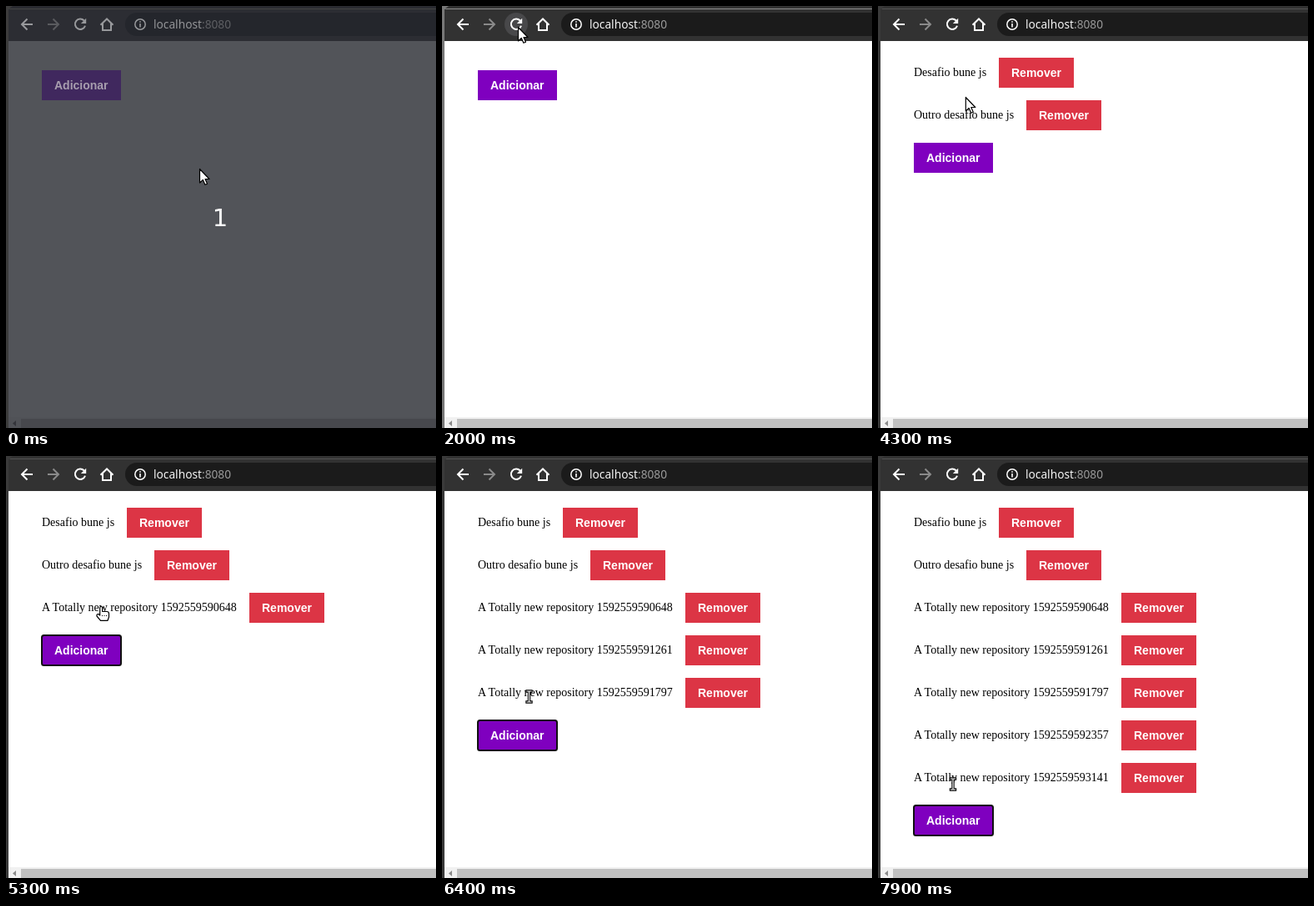
Write an HTML page that moves like this. It is 516 px wide and 506 px high and loops after 8000 ms.

```html
<!DOCTYPE html>
<html lang="pt">
<head>
<meta charset="utf-8">
<title>Lista</title>
<style>
  html, body { margin: 0; width: 100%; height: 100%; overflow: hidden; background: #fff; }
  svg {
    display: block; width: 516px; height: 506px;
    --page: #fff; --bar: #323232; --pill: #1b1b1b; --icon: #fff; --off: #8a8a8a;
    --url: #f4f4f4; --port: #9a9a9a; --button: #7f00bf; --label: #fff;
    --track: #f1f1f1; --thumb: #c1c1c1; --tri: #8a8a8a; --top: #333;
  }
  svg.dim {
    --page: #525459; --bar: #2c2d33; --pill: #24262c; --icon: #98999c; --off: #5a5b5f;
    --url: #939497; --port: #5e5f63; --button: #40285e; --label: #a79eae;
    --track: #505257; --thumb: #47484d; --tri: #33343a; --top: #2a2b31;
  }
  .line { fill: none; stroke: var(--icon); stroke-width: 2; }
  .url { font: 13.72px "Noto Sans", "Open Sans", sans-serif; fill: var(--url); }
  .label { font: bold 14px "Liberation Sans", Arial, sans-serif; fill: var(--label); }
  .item { font: 14px "Liberation Serif", "Times New Roman", serif; fill: #000; }
  .count { font: 29px "DejaVu Sans", sans-serif; fill: #fff; text-anchor: middle; }
</style>
</head>
<body>
<svg id="stage" viewBox="0 0 516 506">
  <rect id="edge" width="516" height="506"/>
  <path d="M8 0H516V3H4z" fill="var(--top)"/>
  <rect id="rim" x="5" y="3" width="511" height="1"/>
  <rect x="3" y="4" width="513" height="38" fill="var(--bar)"/>
  <circle id="hover" cx="89" cy="22" r="14" fill="#48484a"/>
  <path class="line" d="M32 22H19.5M25.5 15.500L19 22L25.500 28.500"/>
  <path class="line" style="stroke:var(--off)" d="M50 22H62.500M56.500 15.500L63 22L56.500 28.500"/>
  <g id="reload">
    <path class="line" d="M93.700 17.500A6.200 6.200 0 1 0 95 23.700"/>
    <path d="M96.200 14.800V21.100H89.900z" fill="var(--icon)"/>
  </g>
  <path id="stop" class="line" d="M84 17L94 27M94 17L84 27"/>
  <path class="line" d="M113.500 22.800L121 15.500L128.500 22.800M116 21V29H126V21"/>
  <rect x="143" y="8" width="400" height="28" rx="14" fill="var(--pill)"/>
  <circle class="line" cx="161" cy="22" r="6.200" style="stroke-width:1.500"/>
  <path class="line" d="M161 18.200V19.800M161 21V25.500" style="stroke-width:1.600"/>
  <text class="url" x="177" y="27">localhost<tspan fill="var(--port)">:8080</tspan></text>

  <rect x="3" y="42" width="513" height="464" fill="var(--page)"/>
  <g id="page">
    <rect x="3" y="493" width="513" height="13" fill="var(--track)"/>
    <rect x="18" y="495" width="498" height="11" fill="var(--thumb)"/>
    <path d="M12 497V504L8 500.500z" fill="var(--tri)"/>
    <g id="rows"></g>
    <g id="add">
      <rect x="43" width="95" height="36" fill="var(--button)"/>
      <rect id="ring" x="43" width="95" height="36" rx="2.500" fill="none" stroke="#101010" stroke-width="2"/>
      <text class="label" x="58" y="23">Adicionar</text>
    </g>
  </g>
  <text id="count" class="count" x="257" y="264">1</text>

  <g id="cursor" stroke-linejoin="round">
    <path id="arrow" d="M.5 .5V17L4.300 13.500L6.900 19.300L9.500 18.200L7 12.500H12z" fill="#fff" stroke="#000" stroke-width="1.200"/>
    <g id="hand" transform="translate(-5.500 -1)">
      <path d="M4.700 10V2A1.500 1.500 0 0 1 7.700 2V6.500H13Q15.500 6.500 15.500 9V13L14 17.300H5.500L1 12Q.4 9.300 3 9.500L4.700 11z" fill="#fff" stroke="#000" stroke-width="1.200"/>
      <path d="M7 11.500H13" stroke="#000" stroke-dasharray="1 1.500"/>
    </g>
    <g id="beam" fill="none" stroke-linecap="square">
      <path d="M-2.500 -6.500H2.500M0 -6.500V6.500M-2.500 6.500H2.500" stroke="#000" stroke-width="3.400"/>
      <path d="M-2.500 -6.500H2.500M0 -6.500V6.500M-2.500 6.500H2.500" stroke="#fff" stroke-width="1.200"/>
    </g>
  </g>
</svg>
<script>
const LOOP = 8000, STEP = 100;
const $ = id => document.getElementById(id);
const show = (id, on) => { $(id).style.display = on ? '' : 'none'; };

const stamped = n => 'A Totally new repository ' + n;
// [appears at, text, x of its button]
const rows = [
  [3300, 'Desafio bune js', 145],
  [3300, 'Outro desafio bune js', 178],
  [5300, stamped('1592559590648'), 292],
  [5900, stamped('1592559591261'), 292],
  [6400, stamped('1592559591797'), 292],
  [7100, stamped('1592559592357'), 292],
  [7800, stamped('1592559593141'), 292]
];
const rowTop = i => 62 + 51 * i;

// [time, hot spot x, y, pointer shape from here on]
const path = [
  [0, 232, 195, 'arrow'], [1100, 232, 195, 'arrow'], [1400, 149, 94, 'arrow'],
  [1500, 149, 94, 'arrow'], [2000, 91, 25, 'arrow'], [4000, 91, 25, 'arrow'],
  [4500, 114, 165, 'hand'], [4700, 113.500, 181, 'hand'], [5400, 113.500, 181, 'hand'],
  [5500, 114, 185, 'beam'], [5600, 115, 203, 'arrow'], [5700, 115, 221, 'hand'],
  [5900, 115, 221, 'hand'], [6000, 113, 231, 'beam'], [6100, 111, 247, 'arrow'],
  [6300, 106, 278, 'hand'], [6400, 104.500, 288.500, 'beam'], [6500, 98, 303, 'arrow'],
  [6600, 98, 303, 'arrow'], [6700, 92, 318, 'hand'], [6900, 84, 333, 'hand'],
  [7100, 84, 333, 'hand'], [7200, 85, 340, 'beam'], [7300, 86, 354, 'arrow'],
  [7400, 88, 369, 'hand'], [7700, 90, 393.500, 'hand'], [7900, 90, 393.500, 'beam']
];

function node(tag, attrs, parent, text = '') {
  const el = document.createElementNS('http://www.w3.org/2000/svg', tag);
  for (const k in attrs) el.setAttribute(k, attrs[k]);
  el.textContent = text;
  return parent.appendChild(el);
}

const rowEls = rows.map(([, text, x], i) => {
  const g = node('g', { transform: `translate(0 ${rowTop(i)})` }, $('rows'));
  node('text', { class: 'item', x: 43, y: 22 }, g, text);
  node('rect', { x, width: 90, height: 36, fill: '#dc3545' }, g);
  node('text', { class: 'label', x: x + 15, y: 23 }, g, 'Remover');
  return g;
});

function pointer(t) {
  let i = path.length - 1;
  while (path[i][0] > t) i--;
  const a = path[i], b = path[i + 1] || a;
  const k = b === a ? 0 : (t - a[0]) / (b[0] - a[0]);
  return { x: a[1] + (b[1] - a[1]) * k, y: a[2] + (b[2] - a[2]) * k, shape: a[3] };
}

const gray = v => `rgb(${v},${v},${v})`;

function draw(t) {
  const dim = t < 500;
  $('stage').classList.toggle('dim', dim);
  show('count', dim);

  // the window frame darkens when the window gets focus
  const focus = Math.min(1, Math.max(0, (t - 2400) / 300));
  $('edge').setAttribute('fill', gray(dim ? 60 : Math.round(120 - 62 * focus)));
  $('rim').setAttribute('fill', gray(dim ? 68 : Math.round(142 - 60 * focus)));

  const loading = t >= 3000 && t < 3200;
  show('hover', t >= 1900 && t < 4100);
  show('stop', loading);
  show('reload', !loading);
  show('page', t < 3100 || t >= 3200);

  let count = 0;
  rows.forEach(([at], i) => {
    const on = t >= at;
    rowEls[i].style.display = on ? '' : 'none';
    count += on;
  });
  $('add').setAttribute('transform', `translate(0 ${count ? rowTop(count) : 77})`);
  show('ring', t >= 5300);

  const p = pointer(t);
  $('cursor').setAttribute('transform', `translate(${p.x} ${p.y})`);
  for (const s of ['arrow', 'hand', 'beam']) show(s, s === p.shape);
}

const start = performance.now();
function tick() {
  const t = (performance.now() - start) % LOOP;
  draw(Math.floor(t / STEP) * STEP);
  requestAnimationFrame(tick);
}
tick();
</script>
</body>
</html>
```
